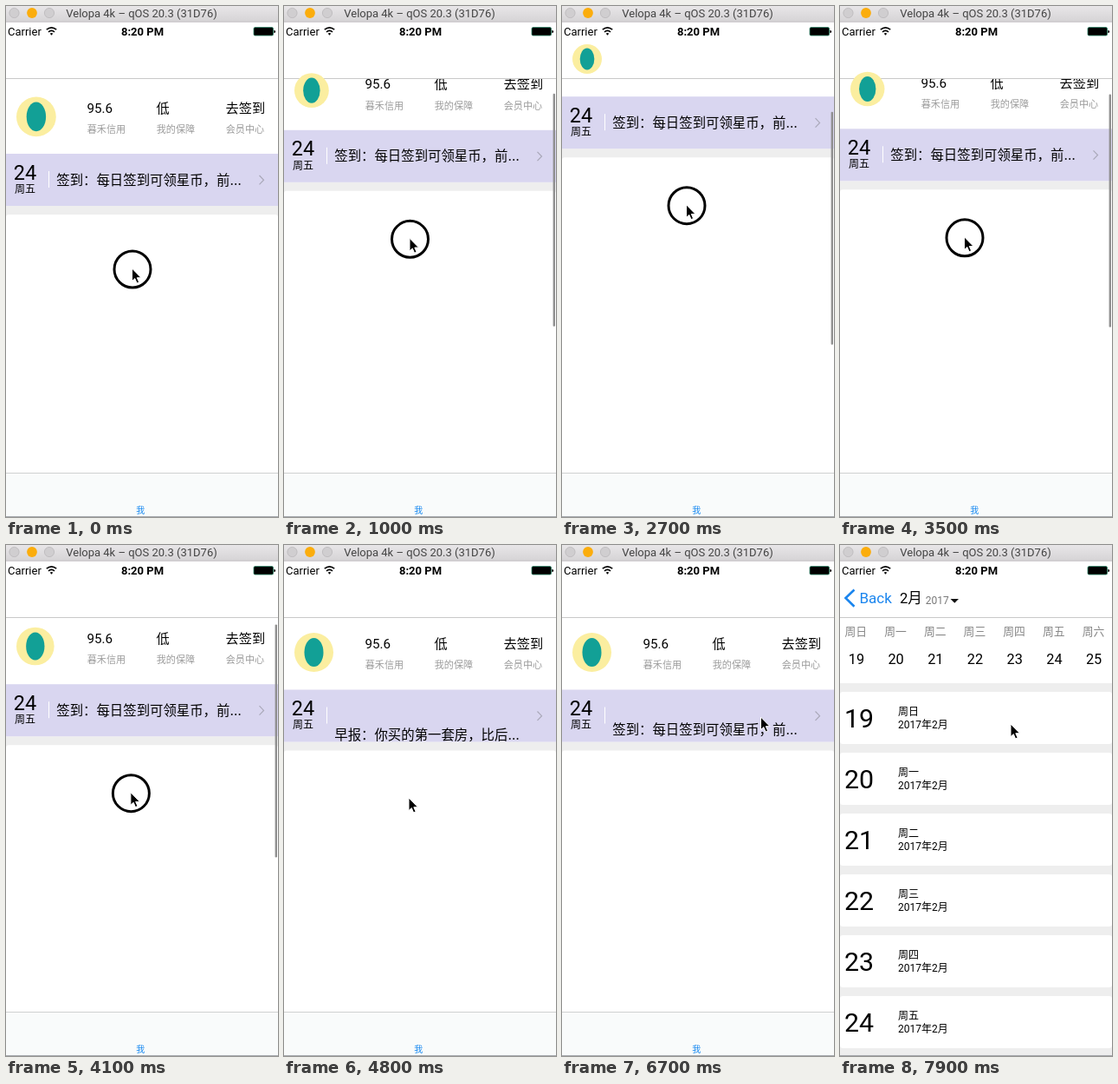
Recreate the animation shown at these times as an HTML page. Size 314x588 px, loop 8000 ms.

```html
<!DOCTYPE html>
<html lang="zh-CN">
<head>
<meta charset="utf-8">
<style>
html, body { margin: 0; width: 100%; height: 100%; overflow: hidden; background: #fff; }
svg { display: block; width: 314px; height: 588px; }
text { font-family: Roboto, "Noto Sans CJK SC", "Noto Sans CJK", sans-serif; white-space: pre; }
</style>
</head>
<body>
<svg id="stage" viewBox="0 0 314 588" xmlns="http://www.w3.org/2000/svg">
  <defs>
    <linearGradient id="chrome" x1="0" y1="0" x2="0" y2="1">
      <stop offset="0" stop-color="#e8e6e8"/><stop offset="1" stop-color="#d5d3d5"/>
    </linearGradient>
    <clipPath id="tickerClip"><rect y="1" width="314" height="61"/></clipPath>
  </defs>
  <rect width="314" height="588" fill="#fff"/>

  <g id="home">
    <rect width="314" height="588" fill="#fff"/>
    <g id="list">
      <g id="stats"></g>
      <rect y="226.5" width="314" height="13" fill="#eeeeee"/>
      <rect y="236.5" width="314" height="400" rx="3" fill="#fff"/>
      <g transform="translate(0 166.5)">
        <rect width="314" height="60" fill="#d9d6f0"/>
        <g id="day"></g>
        <path d="M49.5 20v19" stroke="#fff"/>
        <path d="M292.5 25l5 5.2-5 5.2" fill="none" stroke="#a9a8b8" stroke-width="1.2"/>
        <g id="ticker" clip-path="url(#tickerClip)"></g>
      </g>
    </g>
    <rect id="bar" x="310.6" width="2.4" height="268" rx="1.2" fill="#8f8f8f"/>
    <g id="tab">
      <rect y="537" width="314" height="51" fill="#f9fbfb"/>
      <path d="M0 537.5h314" stroke="#cfd0d0"/>
    </g>
  </g>

  <g id="calendar">
    <rect y="84" width="314" height="504" fill="#eeeeee"/>
    <rect y="84" width="314" height="75" fill="#fff"/>
  </g>

  <rect y="18" width="314" height="66" fill="#fff"/>
  <path d="M0 83.5h314" stroke="#c9c9c9"/>
  <g id="avatar">
    <circle r="22.5" fill="#fbeea0"/>
    <ellipse rx="11" ry="16.5" fill="#12a096"/>
  </g>
  <g id="navItems">
    <path d="M16.5 51.5L6.5 61l10 9.8" fill="none" stroke="#1a85ee" stroke-width="2.6"/>
    <path d="M127.5 62h9.5l-4.7 4.7z" fill="#111"/>
  </g>

  <g id="status">
    <g fill="none" stroke="#000" stroke-width="1.7">
      <path d="M46.8 27.2q5.7-4.7 11.4 0"/>
      <path d="M49 29.8q3.5-2.9 7 0"/>
    </g>
    <path d="M50.8 31.8q1.7-1.4 3.4 0l-1.7 2z"/>
    <rect x="286" y="24.6" width="22.5" height="9.4" rx="1.5" stroke="#2c8767" stroke-width=".8"/>
    <path d="M309.3 27.8q1.8 0 1.8 1.7t-1.8 1.7z"/>
  </g>

  <g id="title">
    <rect width="314" height="18.5" fill="url(#chrome)"/>
    <path d="M0 18.2h314" stroke="#b9b7b9" stroke-width=".7"/>
    <circle cx="9.5" cy="8" r="5.6" fill="#d0ced0" stroke="#bab8ba" stroke-width=".8"/>
    <circle cx="30" cy="8" r="5.9" fill="#fbad0c"/>
    <circle cx="50" cy="8" r="5.6" fill="#d0ced0" stroke="#bab8ba" stroke-width=".8"/>
  </g>
  <path d="M0 587.6h314" stroke="#8c8f93" stroke-width=".8"/>

  <circle id="ring" r="21" fill="none" stroke="#000" stroke-width="3"/>
  <path id="cursor" d="M0 0v14.6l3.3-3 2.3 5.3 2.5-1.1-2.3-5.1h4.7z" fill="#000" stroke="#fff" stroke-width="1"/>
</svg>

<script>
const NS = 'http://www.w3.org/2000/svg';
const LOOP = 8000, FRAME = 100, WIDTH = 314;
const $ = id => document.getElementById(id);

function make(parent, tag, attrs) {
  const el = document.createElementNS(NS, tag);
  for (const k in attrs) el.setAttribute(k, attrs[k]);
  parent.appendChild(el);
  return el;
}

// y is the vertical middle of the glyphs
function label(parent, str, x, y, size, fill = '#000', extra = {}) {
  const el = make(parent, 'text', { x, y: y + size * 0.37, 'font-size': size, fill, ...extra });
  el.textContent = str;
  return el;
}
const mid = { 'text-anchor': 'middle' };

label($('title'), 'Velopa 4k – qOS 20.3 (31D76)', 156.5, 8.5, 13, '#444', mid);
label($('status'), 'Carrier', 2, 29.3, 13);
label($('status'), '8:20 PM', 157.5, 29.3, 13, '#000', { ...mid, 'font-weight': 600 });

[['95.6', '暮禾信用', 94], ['低', '我的保障', 174], ['去签到', '会员中心', 254]].forEach(([value, name, x]) => {
  label($('stats'), value, x - 0.5, 113.5, 15.2);
  label($('stats'), name, x - 0.3, 138.3, 11.1, '#9c9c9c');
});

label($('day'), '24', 22, 20.8, 23.5, '#000', mid);
label($('day'), '周五', 22, 40.5, 12, '#000', mid);
label($('tab'), '我', 155.3, 579.8, 10, '#1688f0', mid);

const lines = ['签到：每日签到可领星币，前', '早报：你买的第一套房，比后'].map(str => {
  const el = label($('ticker'), str, 58.3, 30, 15.4);
  const dots = make(el, 'tspan', { 'font-family': 'Inter, sans-serif' });
  dots.textContent = '…';
  return el;
});

const nav = $('navItems');
label(nav, 'Back', 22.5, 61, 17, '#1a85ee');
label(nav, '2月', 69, 60.5, 16.6);
label(nav, '2017', 98.8, 63.6, 12, '#777');

const cal = $('calendar');
[...'日一二三四五六'].forEach((d, i) => {
  const x = 18.3 + i * 45.7, date = 19 + i;
  label(cal, '周' + d, x, 99, 12.8, '#858585', mid);
  label(cal, date, x + 0.6, 131, 16.3, '#000', mid);
  if (i > 5) return;
  const y = 169 + i * 70;
  make(cal, 'rect', { y, width: WIDTH, height: 60, rx: 3, fill: '#fff' });
  label(cal, date, 22, y + 30, 30.3, '#000', mid);
  label(cal, '周' + d, 67, y + 22.6, 12);
  label(cal, '2017年2月', 67, y + 37.3, 12);
});

const clamp = v => Math.max(0, Math.min(1, v));
const span = (t, from, length) => clamp((t - from) / length);
const easeInOut = p => p * p * (3 - 2 * p);
const easeOut = p => 1 - (1 - p) ** 3;

// Pointer tip: [time, x, y]
const path = [
  [0, 145.5, 302], [500, 145.5, 286], [1000, 145, 267.3], [1800, 144.5, 242],
  [2400, 143.5, 227.5], [2550, 143.5, 227.5], [2700, 143.5, 228.7], [3400, 143.5, 261],
  [3500, 143.5, 265.8], [4300, 144, 291], [4850, 144, 291], [5200, 158, 262],
  [5700, 212, 212], [6100, 229.5, 198], [7600, 229.5, 198], [7900, 197, 206], [8000, 197, 206]
];

function pointer(t) {
  let i = 1;
  while (path[i][0] < t) i++;
  const a = path[i - 1], b = path[i], p = span(t, a[0], b[0] - a[0]);
  return [1, 2].map(k => a[k] + (b[k] - a[k]) * p);
}

const move = (id, x, y, more = '') => $(id).setAttribute('transform', `translate(${x} ${y}) ${more}`);
const fade = (id, v) => $(id).setAttribute('opacity', v);

function draw(t) {
  const [x, y] = pointer(t);
  const dragging = t < 4400;
  const pull = 291 - y;
  const scroll = dragging ? (pull < 0 ? pull * 0.32 : pull) : 0;

  move('list', 0, -scroll);
  move('bar', 0, 88 + 0.54 * scroll);
  fade('bar', span(t, 50, 250) * (1 - span(t, 4400, 300)));

  // Each tick pushes the next headline in from below
  const first = easeInOut(span(t, 4505, 500));
  const second = easeInOut(span(t, 6370, 500));
  lines[0].setAttribute('transform', `translate(0 ${second > 0 ? 60 * (1 - second) : -60 * first})`);
  lines[1].setAttribute('transform', `translate(0 ${60 * (1 - first) - 60 * second})`);

  const push = easeOut(span(t, 6900, 550));
  move('home', -0.3 * WIDTH * push, 0);
  move('calendar', WIDTH * (1 - push), 0);
  move('navItems', 60 * (1 - push), 0);
  fade('navItems', push);

  const size = Math.max(34, 45 - 0.22 * scroll);
  const top = Math.max(44, 101 - scroll);
  move('avatar', 12 + size / 2 - 90 * push, top + size / 2, `scale(${size / 45})`);
  fade('avatar', clamp(1 - 1.5 * push));

  move('cursor', x, y);
  move('ring', x + 0.5, y + 1);
  fade('ring', dragging || (t >= 6750 && t < 6900) ? 1 : 0);
}

const start = performance.now();
function tick() {
  const t = (performance.now() - start) % LOOP;
  draw(Math.floor(t / FRAME) * FRAME);
  requestAnimationFrame(tick);
}
draw(0);
requestAnimationFrame(tick);
</script>
</body>
</html>
```
